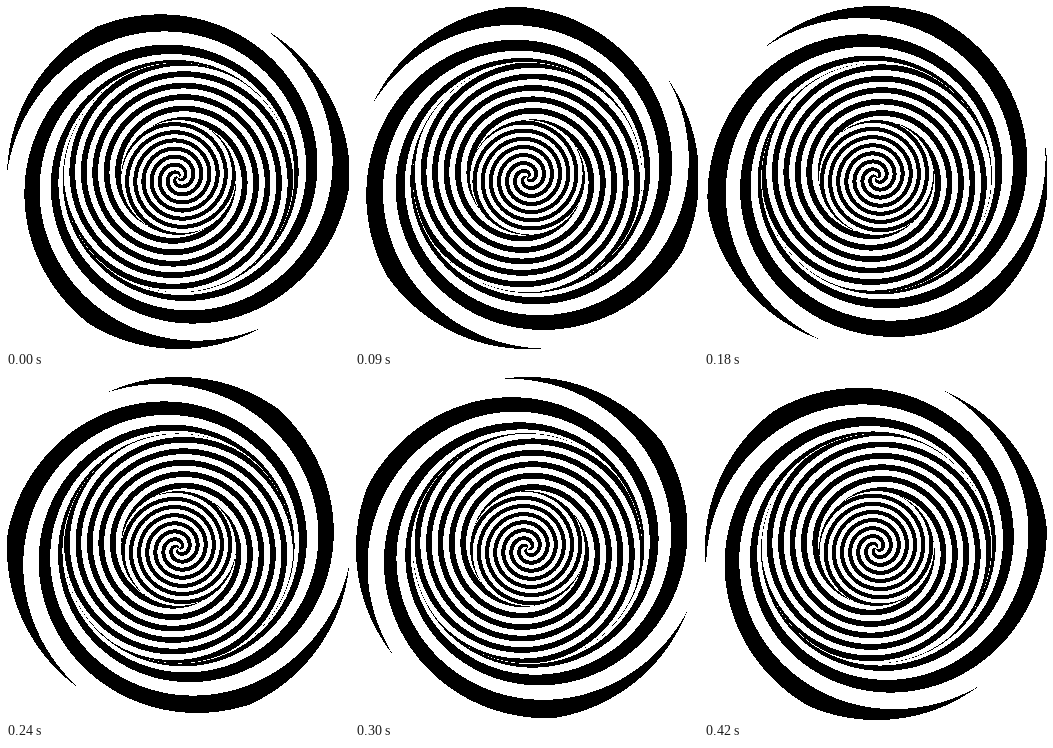
These frames come from a looping animation (343 px wide and 343 px high, 0.45 s). An HTML page with a canvas:

```html
<!DOCTYPE html>
<html>
<head>
<meta charset="utf-8">
<style>
html, body { margin: 0; overflow: hidden; background: #fff; }
canvas { display: block; }
</style>
</head>
<body>
<canvas id="stage" width="343" height="343"></canvas>
<script>
const SIZE = 343, CENTER_X = 172, CENTER_Y = 171, RADIUS = 171.5, RING = 172 / 3;
const STEP_MS = 30, STEPS = 15, PERIOD = 120;
const ctx = document.getElementById('stage').getContext('2d');
const image = ctx.createImageData(SIZE, SIZE);
const pixels = new Uint32Array(image.data.buffer);

// Angle, in degrees, by which the arms have wound at radius r.
// The middle ring winds backwards and swaps black and white.
function winding(r) {
  const ring = r / RING;
  if (ring > 2) return 360 * (1 - (ring - 2) ** 0.46);
  if (ring > 1) return 600 * (ring - 1) - 180;
  return 840 * (1 - ring) - 240;
}

const phase = Float32Array.from(pixels, (_, i) => {
  const x = i % SIZE - CENTER_X, y = Math.floor(i / SIZE) - CENTER_Y;
  const r = Math.hypot(x, y);
  return r > RADIUS ? NaN : Math.atan2(y, x) * 180 / Math.PI - winding(r) + 3600;
});

let shown = -1;
function draw(now) {
  const step = Math.floor(now / STEP_MS) % STEPS;
  if (step !== shown) {
    shown = step;
    const turn = step * PERIOD / STEPS;
    phase.forEach((p, i) => {
      pixels[i] = (p - turn) % PERIOD >= PERIOD / 2 ? 0xff000000 : 0xffffffff;
    });
    ctx.putImageData(image, 0, 0);
  }
  requestAnimationFrame(draw);
}
requestAnimationFrame(draw);
</script>
</body>
</html>
```
